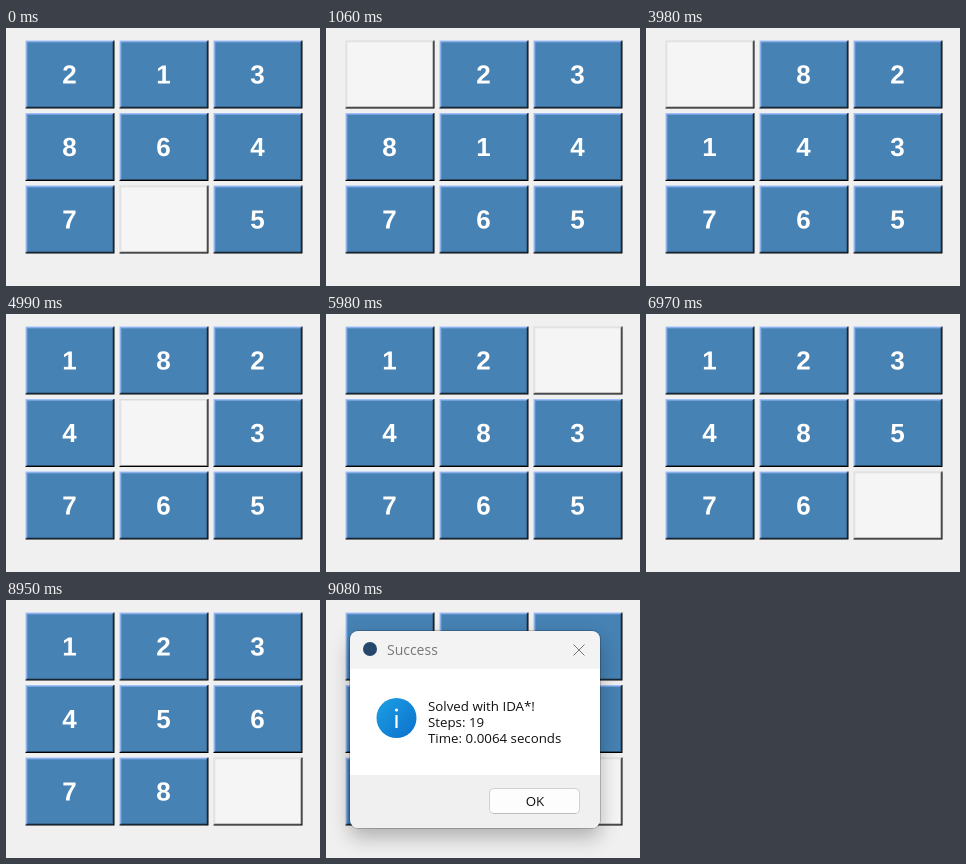
An HTML page with a canvas that plays this animation: 314 px wide and 258 px high, repeating every 9.14 s.

```html
<!DOCTYPE html>
<html lang="en">
<head>
<meta charset="utf-8">
<title>Sliding puzzle</title>
<style>
html, body { margin: 0; width: 100%; height: 100%; overflow: hidden; background: #f0f0f0; }
#stage { position: relative; width: 314px; height: 258px; overflow: hidden; }
#board { display: block; width: 314px; height: 258px; }
#dialog {
  position: absolute; left: 24px; top: 31px; width: 250px; height: 197px;
  border-radius: 8px; overflow: hidden; visibility: hidden;
  background: linear-gradient(#f3f3f3 38px, #fff 38px 144px, #f0f0f0 144px);
  box-shadow: 0 0 0 1px rgba(0, 0, 0, .2), 0 9px 20px rgba(0, 0, 0, .28);
}
#dialog svg { display: block; font: 13.3px "Open Sans", "Noto Sans", sans-serif; fill: #111; }
</style>
</head>
<body>
<div id="stage">
  <canvas id="board" width="628" height="516"></canvas>
  <div id="dialog">
    <svg width="250" height="197" viewBox="24 31 250 197">
      <defs>
        <linearGradient id="blue" x1="0" y1="0" x2="1" y2="1">
          <stop offset="0" stop-color="#1ca0e4"/>
          <stop offset="1" stop-color="#0c70cc"/>
        </linearGradient>
      </defs>
      <circle cx="44" cy="49" r="7" fill="#24476b"/>
      <text x="61" y="55" font-size="14" fill="#777">Success</text>
      <path d="M247.5 44.5l11 11m0-11l-11 11" stroke="#777" fill="none"/>
      <circle cx="70.5" cy="118" r="20" fill="url(#blue)"/>
      <path d="M70.5 115v13" stroke="#fff" stroke-width="2.2"/>
      <circle cx="70.5" cy="110" r="1.6" fill="#fff"/>
      <text x="102" y="111">Solved with IDA*!</text>
      <text x="102" y="127">Steps: 19</text>
      <text x="102" y="143">Time: 0.0064 seconds</text>
      <rect x="163.5" y="188.5" width="90" height="25" rx="4" fill="#fdfdfd" stroke="#d0d0d0"/>
      <path d="M167 213.5h83" stroke="#bbb"/>
      <text x="209" y="206" text-anchor="middle">OK</text>
    </svg>
  </div>
</div>
<script>
const LOOP = 9140, DIALOG_AT = 9080;
const START = "2138647 5";
// Cells the gap visits, and when it arrives at each.
const PATH = [4, 1, 0, 3, 4, 5, 2, 1, 0, 3, 4, 1, 2, 5, 8, 7, 4, 5, 8];
const TIMES = [70, 530, 1060, 1560, 2000, 2530, 2990, 3520, 3980, 4510,
               4990, 5500, 5980, 6510, 6970, 7500, 7960, 8490, 8950];
// Board geometry is in half pixels: the canvas is shown at half its size.
const LEFT = 39, TOP = 25, PITCH_X = 188, PITCH_Y = 145, WIDTH = 178, HEIGHT = 136, BEVEL = 2;
// Outer shade, outer light, inner shade, inner light, face.
const BLUE = ["#000", "#a2c0fc", "#2a4e6c", "#74a1d8", "#4682b4"];
const EMPTY = ["#000", "#dcdcdc", "#939393", "#e9e9e9", "#f5f5f5"];

const ctx = document.getElementById("board").getContext("2d");
const dialog = document.getElementById("dialog");
ctx.font = 'bold 52px "Liberation Sans", Arial, sans-serif';
ctx.textAlign = "center";

function boardAfter(moves) {
  const board = [...START];
  let gap = board.indexOf(" ");
  for (const next of PATH.slice(0, moves)) {
    [board[gap], board[next]] = [board[next], board[gap]];
    gap = next;
  }
  return board;
}

function drawTile(label, cell) {
  const x = LEFT + PITCH_X * (cell % 3);
  const y = TOP + PITCH_Y * Math.floor(cell / 3);
  // Each layer leaves a strip of the one below: first right and bottom, then left and top.
  (label === " " ? EMPTY : BLUE).forEach((color, layer) => {
    const near = BEVEL * Math.floor(layer / 2);
    const trim = BEVEL * layer;
    ctx.fillStyle = color;
    ctx.fillRect(x + near, y + near, WIDTH - trim, HEIGHT - trim);
  });
  ctx.fillStyle = "#fff";
  ctx.fillText(label, x + 88, y + 86);
}

let shown = -1;
function render(time) {
  const moves = TIMES.filter(t => t <= time).length;
  if (moves !== shown) {
    ctx.clearRect(0, 0, 628, 516);
    boardAfter(moves).forEach(drawTile);
    shown = moves;
  }
  dialog.style.visibility = time >= DIALOG_AT ? "visible" : "hidden";
}

const origin = performance.now();
function tick() {
  render((performance.now() - origin) % LOOP);
  requestAnimationFrame(tick);
}
tick();
</script>
</body>
</html>
```
